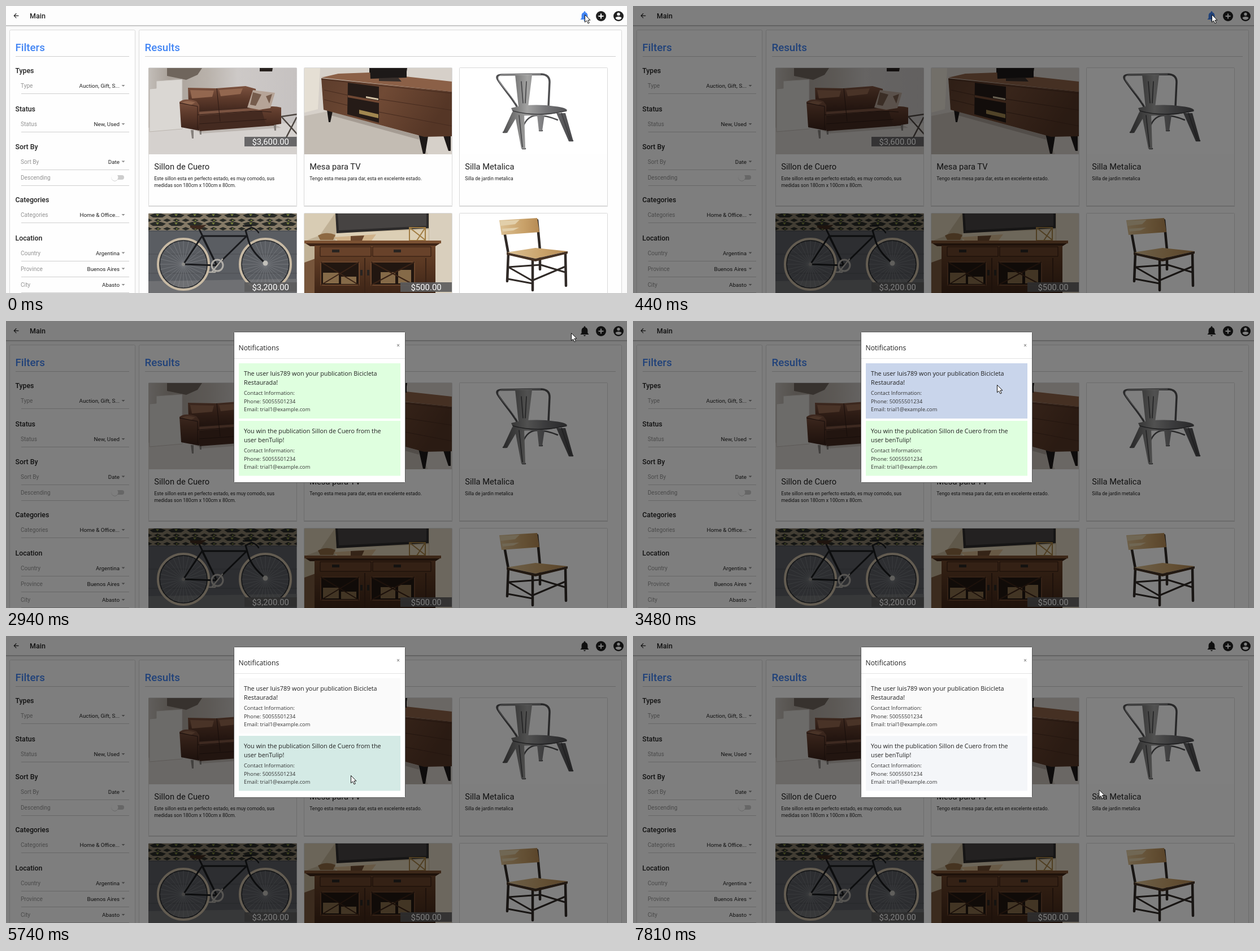
An HTML page for the animation above (8 s loop, 1099 by 509 pixels).

```html
<!DOCTYPE html>
<html lang="en">
<head>
<meta charset="utf-8">
<title>Main</title>
<style>
html, body { margin: 0; width: 100%; height: 100%; overflow: hidden; background: #fafafa; }
svg { display: block; width: 100%; height: 100%; }
text { font-family: Roboto, Arial, sans-serif; fill: #212121; white-space: pre; }
.bar { font-size: 12.5px; font-weight: 500; }
.title { font-size: 18.7px; font-weight: 500; fill: #4285f4; }
.head { font-size: 12.3px; font-weight: 500; }
.label { font-size: 10.1px; fill: #949494; }
.value { font-size: 9.8px; text-anchor: end; }
.name { font-size: 14.7px; }
.desc { font-size: 8.55px; }
.price { font-size: 14.9px; fill: #fff; }
#modal text { font-family: "Open Sans", "Noto Sans", sans-serif; }
#modal .caption { font-size: 12.2px; }
#modal .lead { font-size: 10.8px; font-weight: 500; }
#modal .info { font-size: 9.3px; fill: #333; }
#modal .close { font-size: 10px; text-anchor: middle; fill: #666; }
.line { stroke: #cfcfcf; }
.box { fill: #fefefe; stroke: #d9d9d9; }
.tube { fill: none; stroke-linecap: round; stroke-linejoin: round; }
</style>
</head>
<body>
<svg viewBox="0 0 1099 509" preserveAspectRatio="none">
<defs>
  <linearGradient id="wall"><stop offset="0" stop-color="#c3beb9"/><stop offset=".14" stop-color="#a9a199"/><stop offset=".4" stop-color="#b9b2ab"/><stop offset=".6" stop-color="#cdc9c7"/><stop offset="1" stop-color="#c6c2c1"/></linearGradient>
  <linearGradient id="hide" x2="0" y2="1"><stop offset="0" stop-color="#7d5340"/><stop offset=".45" stop-color="#5d3a2b"/><stop offset="1" stop-color="#3a221a"/></linearGradient>
  <linearGradient id="wood" x2="1" y2=".3"><stop offset="0" stop-color="#5d3d2c"/><stop offset=".5" stop-color="#704a35"/><stop offset="1" stop-color="#553626"/></linearGradient>
  <linearGradient id="oak" x2="0" y2="1"><stop offset="0" stop-color="#6a4329"/><stop offset="1" stop-color="#3e2517"/></linearGradient>
  <linearGradient id="steel"><stop offset="0" stop-color="#4f4f50"/><stop offset=".35" stop-color="#a3a3a2"/><stop offset=".6" stop-color="#77777a"/><stop offset="1" stop-color="#48484a"/></linearGradient>
  <linearGradient id="pine"><stop offset="0" stop-color="#dcc194"/><stop offset=".6" stop-color="#c9a26a"/><stop offset="1" stop-color="#b58a54"/></linearGradient>
  <pattern id="blocks" x="252" y="368" width="33" height="15" patternUnits="userSpaceOnUse">
    <path fill="#857a67" d="M0 0h33v15H0z"/>
    <path fill="#292b27" d="M2 3 11 0h11l9 3-6 4H8zM0 9l7 3-7 3zM33 9l-7 3 7 3zM10 12l6-3 7 3-6 3z"/>
    <path fill="#77803e" d="M13 1h6l-3 4zM16 11l4 1-4 2z"/>
  </pattern>
  <clipPath id="top"><path d="M252 110h262.500v153H252zM528 110h261v153H528z"/></clipPath>
  <clipPath id="low"><path d="M252 368h262.500v141H252zM528 368h261v141H528z"/></clipPath>
</defs>

<g id="page">
  <path fill="#fafafa" d="M0 0h1099v509H0z"/>
  <path fill="#fdfdfd" d="M0 0h1099v34H0z"/>
  <path stroke="#bcbcbc" d="M0 34.500h1099"/><path stroke="#d8d8d8" d="M0 35.500h1099"/><path stroke="#efefef" d="M0 36.500h1099"/>
  <rect class="box" x="6.500" y="42.500" width="222" height="480" rx="2"/>
  <rect class="box" x="235.500" y="42.500" width="854" height="480" rx="2"/>
  <path class="line" d="M17 89.500h201M246 89.500h833"/>
  <g fill="#212121">
    <path transform="translate(11.200 10.600) scale(.56)" d="M20 11H7.830l5.590-5.590L12 4l-8 8 8 8 1.410-1.410L7.830 13H20z"/>
    <path id="bell" transform="translate(1013.200 7) scale(.9)" d="M12 22c1.100 0 2-.9 2-2h-4c0 1.100.89 2 2 2zm6-6v-5c0-3.070-1.640-5.640-4.500-6.320V4a1.500 1.500 0 0 0-3 0v.68C7.630 5.360 6 7.920 6 11v5l-2 2v1h16v-1z"/>
    <circle cx="1053" cy="18" r="9"/><path d="M1048.500 18h9M1053 13.500v9" stroke="#fff" stroke-width="2"/>
    <circle cx="1084" cy="18" r="9"/><circle cx="1084" cy="14.400" r="2.700" fill="#fff"/><path fill="#fff" d="M1078.600 21.600c0-1.800 3.600-2.800 5.400-2.800s5.400 1 5.400 2.800a6.500 6.500 0 0 1-10.800 0z"/>
  </g>
  <rect x="190" y="300" width="19" height="8" rx="4" fill="#cdcdcd"/>
  <circle cx="192.500" cy="304.800" r="6" fill="#c4c4c4"/><circle cx="192.500" cy="304" r="6" fill="#fdfdfd"/>
</g>

<g id="photos">
  <g clip-path="url(#top)">
    <!-- sofa -->
    <path fill="url(#wall)" d="M252 110h263v153H252z"/>
    <path fill="#6f655c" d="M285 110h62l-8 12-20 9-34-7z"/>
    <path fill="#d5d1ce" d="M252 216l60-8h203v55H252z"/>
    <path fill="#dad7d3" stroke="#bbb5af" d="M266 133l46-3v88l-58 5v-76l12-1z"/>
    <path fill="#27211e" d="M449 110h23l-1 6h-22z"/>
    <path fill="#bdb7b2" d="M330 219l148-8 9 5-139 10z"/>
    <path fill="#85807c" d="M327 220h5v15h-3zM473 207h5v14h-3zM342 218h4v10h-3z"/>
    <path fill="url(#hide)" d="M322 145l50 1 52-4 18 5 3 40-108 5-14-20z"/>
    <path fill="#442a20" d="M333 185l105-6 37 5-1 28-131 10z"/>
    <path fill="#7a5341" d="M336 188l100-7 36 3-130 10z"/>
    <path fill="url(#hide)" d="M307 170q10-8 30-1l5 7v45l-32-6zM452 183q14-8 35-3v29l-26 4z"/>
    <path fill="#93674f" d="M326 149l42 1-3 11-36 3zM377 149l42-3-4 10-35 4zM311 171q10-5 24 0l-8 5z"/>
    <path fill="none" stroke="#2e1b15" d="M373 146l4 40 2 19M339 193l101-7 30 2M342 209l119-8M307 172l32 6v40"/>
    <path fill="#b6a497" d="M427 180l10-31 39 5-8 27-20 3z"/>
    <path fill="#765c4c" d="M437 153l15 4-10 20-10-2zM460 160l11-4-5 17z"/>
    <path class="tube" stroke="#4c4540" stroke-width="2.500" d="M488 196l27-4M488 197l27 30M514 198l-19 37"/>
    <!-- console -->
    <path fill="#d6d0c9" d="M528 110h262v153H528z"/>
    <path fill="#e5dfd4" d="M528 110h28l-4 73-24 6z"/>
    <path fill="#c3bcb3" d="M528 195l45-9 156 40 18 37H528z"/>
    <path fill="#a59c93" d="M578 188l153 42v7l-156-43z"/>
    <path fill="#1d1918" d="M643 110h67l-3 20-15 4-19-5h-30zM568 184l10 3-4 19h-3zM730 227l17 4-5 31h-4zM774 230h13v27h-4z"/>
    <path fill="#8b6047" d="M558 127l30-7 55-2 147 16v18z"/>
    <path fill="url(#wood)" d="M558 128l232 24v79l-50 1-178-48z"/>
    <path fill="#251b17" d="M605 136l55 7v64l-56-15z"/>
    <path fill="#704833" d="M605 158l55 10v4l-55-10z"/>
    <path fill="#a18750" d="M625 184l34 8v7l-34-8z"/><path fill="#d4c3a5" d="M637 160l22 4v3l-22-4z"/>
    <path fill="none" stroke="#462b1f" d="M558 130l232 25M563 149l41 9M563 166l41 10M660 165l130 20M660 188l130 25"/>
    <path fill="#1d1918" d="M644 110h65v17l-64 2z"/><path fill="#382f2b" d="M660 128l34-1 6 7-40-1z"/>
  </g>
  <!-- metal chair -->
  <path fill="#fff" d="M803 111h261v152H803z"/>
  <g class="tube" stroke="#505052">
    <path stroke-width="3.500" d="M904 178C894 160 878 144 870 130q-4-8 8-8l70-1q14 1 14 14l-2 43"/>
    <path stroke-width="2.500" d="M915 214q8-20 25-20t36 8M914 253h5M997 239h6M880 224h5M944 221h5"/>
    <path stroke="#c2c2c2" d="M902 172C890 152 872 138 871 128q1-6 10-6l65-1"/>
  </g>
  <path fill="url(#steel)" d="M901 122h30l-7 57h-17zM896 188h13l-22 37h-8zM900 190h17l2 63h-7zM974 190h16l14 50h-8zM940 194h13l-4 27h-6zM894 181q35-9 78-3 19 2 21 7-35 12-93 9z"/>
  <path class="tube" stroke="#3e3e40" stroke-width="1.500" d="M912 134l3 38M921 134l-2 38M897 186q42 12 95 0M908 194l6 56M983 190l16 47"/>

  <g clip-path="url(#low)">
    <!-- bicycle -->
    <path fill="#5a5d62" d="M252 368h263v141H252z"/>
    <path fill="url(#blocks)" d="M252 368h263v30H252z"/>
    <path fill="#6f7073" d="M252 488l263-4v25H252z"/>
    <path stroke="#4c4f53" d="M252 399.500h263M252 440h263M252 474h263"/>
    <g fill="none" stroke="#c8baa4" stroke-width="4"><circle cx="314" cy="458" r="45"/><circle cx="459" cy="458" r="45"/></g>
    <g fill="none" stroke="#26282b" stroke-width="1.500"><circle cx="314" cy="458" r="42"/><circle cx="459" cy="458" r="42"/></g>
    <g id="spokes" stroke="#94969a" stroke-width=".45"></g>
    <g class="tube" stroke="#191a1d" stroke-width="3">
      <path d="M347 408h79l-53 52zM373 460l-59-2 33-50M342 396l31 64M424 398l5 18q6 20 30 40"/>
      <path stroke-width="2.500" d="M424 398l11-5q9 3 12 9M434 390l-14 0"/>
    </g>
    <path fill="#3d281d" d="M326 389q11 1 29-1l-10 8q-13-1-19-3z"/>
    <circle cx="374" cy="460" r="10" fill="none" stroke="#b1aea8" stroke-width="3"/>
    <path class="tube" stroke="#b1aea8" stroke-width="2.500" d="M374 460l-9 11M374 460l9-11M360 472h10"/>
    <circle cx="314" cy="458" r="3" fill="#8d8c89"/><circle cx="459" cy="456" r="4.500" fill="#c2c0ba"/>
    <!-- cabinet -->
    <path fill="#c0b196" d="M528 368h262v141H528z"/><path fill="#d8ccb4" d="M528 368h54l-27 39-27 10z"/>
    <path fill="#d9cfbd" d="M749 368h41v141h-41z"/><path fill="#dccfb5" d="M583 403l165-7v20H583z"/>
    <path fill="#77563c" d="M528 455l22-8v62h-22z"/>
    <path fill="#2c2a2a" d="M583 368h165v26l-163 9z"/><path fill="#464342" d="M587 368h157v22l-155 8z"/>
    <path fill="#8d6942" d="M552 407q15-8 31-1l-4 9h-23z"/><path fill="#d0b38b" d="M580 410l75-5-8 11h-60z"/><path fill="#6b482e" d="M610 408l24-1-4 9h-20z"/>
    <path fill="none" stroke="#a07c42" stroke-width="2" d="M714 393h28v23h-28zl28 22M742 393l-15 23"/>
    <path fill="#7b5132" d="M528 416h242v5H528z"/><path fill="#3d2416" d="M530 421h238l-8 5H538z"/>
    <path fill="url(#oak)" d="M546 425h214v84H546z"/>
    <path fill="#68422a" stroke="#2c190f" d="M556 427h90v17h-90zM649 427h103v17H649z"/>
    <path fill="#211610" stroke="#6a452c" stroke-width="2" d="M557 454h68v41h-68zM646 454h77v41h-77z"/>
    <path fill="#856a48" d="M561 473h28v19h-28zM593 480h27v13h-27zM663 472h26v20h-26zM694 468h23v24h-23z"/>
    <path stroke="#3a2316" stroke-width="2" d="M557 454l68 41M625 454l-68 41M646 454l77 41M723 454l-77 41M635 447v62M743 447v62"/>
    <path fill="#292421" d="M577 432h13v5h-13zM686 432h13v5h-13zM627 468h4v10h-4zM639 468h4v10h-4z"/>
  </g>
  <!-- wooden chair -->
  <path fill="#fff" d="M803 369h261v140H803z"/>
  <g class="tube" stroke="#302a27">
    <path stroke-width="4.500" d="M879 384l10 55-2 49M940 380l5 53v34M932 450v54M990 438l1 58"/>
    <path stroke-width="3" d="M889 463l42 24 59-25M889 463l57-4 43 13M888 484l43 8"/>
  </g>
  <path fill="url(#pine)" d="M873 380l67-4 4 25-67 5z"/><path fill="#e2cfaa" d="M874 381l35-2-8 8-26 3zM878 395l30-2-10 5-19 2z"/>
  <path fill="url(#pine)" d="M886 437l51-8 57 6-57 13z"/><path fill="#453224" d="M886 437l51 11 57-13v4l-57 14-51-12z"/>
</g>

<g id="labels"></g>
<rect id="dim" width="1099" height="509"/>
<g id="modal">
  <rect x="403.500" y="19.500" width="303" height="267" rx="1" fill="#fff" stroke="#5a5a5a"/>
  <path stroke="#e3e3e3" d="M404 66.500h302"/>
  <rect id="item0" x="412" y="75" width="286" height="98"/>
  <rect id="item1" x="412" y="177" width="286" height="97.500"/>
</g>
<path id="cursor" fill="#fff" stroke="#111" stroke-linejoin="round" d="M.5.5v13.300l3-2.800 2.600 5 2.200-1.100-2.500-4.800H10z"/>
</svg>
<script>
const $ = id => document.getElementById(id);
const add = (id, markup) => $(id).insertAdjacentHTML('beforeend', markup);
const write = (cls, x, y, str, id = 'labels') =>
  add(id, `<text class="${cls}" x="${x}" y="${y}">${str.replace(/&/g, '&amp;')}</text>`);

write('bar', 42, 21.5, 'Main');
write('title', 16.5, 80, 'Filters');
write('title', 245.5, 80, 'Results');
[['Types', 119], ['Status', 187], ['Sort By', 253.5], ['Categories', 348], ['Location', 415.5]]
  .forEach(([str, y]) => write('head', 16.5, y, str));

[['Type', 'Auction, Gift, S...', 145], ['Status', 'New, Used', 213], ['Sort By', 'Date', 279.5],
 ['Descending', '', 307.5], ['Categories', 'Home & Office...', 374], ['Country', 'Argentina', 441.5],
 ['Province', 'Buenos Aires', 469.5], ['City', 'Abasto', 498]].forEach(([label, value, y]) => {
  write('label', 26, y, label);
  const base = Math.round(y + 10) + .5;
  add('page', `<path class="line" d="M27 ${base}h191"/>`);
  if (!value) return;
  write('value', 201, y, value);
  add('page', `<path fill="#8c8c8c" d="M204.500 ${y - 5}h6l-3 3z"/>`);
});

const cards = [
  ['Sillon de Cuero', 'Este sillon esta en perfecto estado, es muy comodo, sus', 'medidas son 180cm x 100cm x 80cm.'],
  ['Mesa para TV', 'Tengo esta mesa para dar, esta en excelente estado.'],
  ['Silla Metalica', 'Silla de jardin metalica']
];
cards.forEach(([name, ...lines], i) => {
  const x = 252 + i * 275;
  [110, 368].forEach(y => add('page',
    `<rect class="box" x="${x + .5}" y="${y - .5}" width="262" height="245" rx="1"/>
     <path stroke="#c4c4c4" d="M${x} ${y + 245}h263"/>`));
  write('name', x + 10.2, 290, name);
  lines.forEach((str, k) => write('desc', x + 10.2, 308.5 + k * 12, str));
});
[['$3,600.00', 422, 232], ['$3,200.00', 422, 490], ['$500.00', 698, 490]].forEach(([str, x, y]) => {
  add('photos', `<rect x="${x}" y="${y}" width="${x < 500 ? 92.5 : 91}" height="17" fill="#5c5c5e" fill-opacity=".9"/>`);
  write('price', x < 500 ? x + 13.5 : x + 18.5, y + 13.7, str);
});

for (let i = 0; i < 28; i++) {
  const a = i * Math.PI / 14, dx = 42 * Math.cos(a), dy = 42 * Math.sin(a);
  add('spokes', `<path d="M314 458l${dx} ${dy}M459 458l${dx} ${dy}"/>`);
}

write('caption', 411.5, 52, 'Notifications', 'modal');
write('close', 694, 46.5, '×', 'modal');
[['The user luis789 won your publication Bicicleta', 'Restaurada!'],
 ['You win the publication Sillon de Cuero from the', 'user benTulip!']].forEach((lead, i) => {
  const y = i * 102;
  lead.forEach((str, k) => write('lead', 421, 97 + y + k * 16, str, 'modal'));
  ['Contact Information:', 'Phone: 50055501234', 'Email: trial1@example.com']
    .forEach((str, k) => write('info', 421, 131 + y + k * 14.7, str, 'modal'));
});

// Each track holds [time, ...values]; a value stays until the next entry.
const at = (track, t) => track.filter(k => k[0] <= t).pop();
const pointer = [
  [0, 1024, 15], [2940, 1000, 21], [3060, 853, 81], [3210, 735, 105], [3330, 652, 112], [3480, 644, 113],
  [4780, 695, 127], [4930, 745, 170], [5050, 787, 217], [5200, 780, 243], [5350, 760, 252], [5470, 725, 255],
  [5590, 707, 255], [5740, 610, 247], [5860, 557, 243], [6010, 556, 243], [6140, 555, 243], [7220, 586.5, 247.5],
  [7380, 678, 250], [7530, 742, 255], [7680, 790, 265], [7810, 824.5, 272.5]
];
const dim = [[0, 0], [310, .115], [440, .5]];
const modal = [[0, 0, -67], [560, .5, -30], [680, 1, -6], [820, 1, 0]];
const bell = [[0, '#4285f4'], [560, '#212121']];
const green = '#dfffdf', blue = '#c9d5eb';
const items = [
  [[0, green], [3330, '#d6ede4'], [3480, blue], [4930, '#dae2f0'], [5050, '#f2f4f8'], [5200, '#fafafa']],
  [[0, green], [5740, '#d4eae5'], [5860, blue], [7680, '#dfe6f2'], [7810, '#f4f6f9']]
];

function draw(now) {
  const t = now % 8000;
  const [, x, y] = at(pointer, t), [, alpha, shift] = at(modal, t);
  $('cursor').setAttribute('transform', `translate(${x} ${y})`);
  $('dim').setAttribute('opacity', at(dim, t)[1]);
  $('modal').setAttribute('opacity', alpha);
  $('modal').setAttribute('transform', `translate(0 ${shift})`);
  $('bell').setAttribute('fill', at(bell, t)[1]);
  items.forEach((track, i) => $('item' + i).setAttribute('fill', at(track, t)[1]));
  requestAnimationFrame(draw);
}
draw(performance.now());
</script>
</body>
</html>
```
